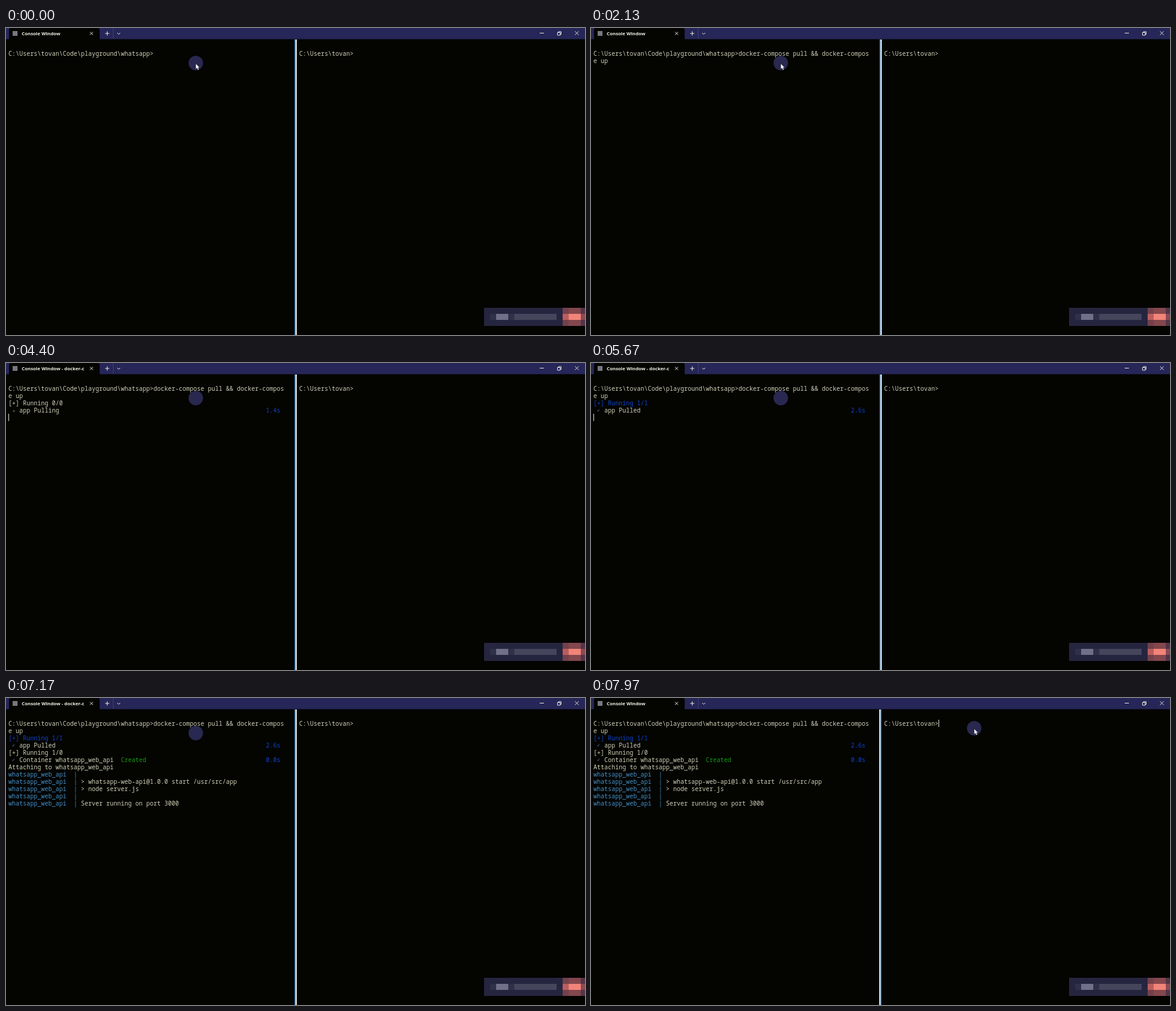
These frames come from a looping animation (958x508 px, 8 s). An HTML page:

```html
<!DOCTYPE html>
<html lang="en">
<head>
<meta charset="utf-8">
<title>Terminal session</title>
<style>
  html, body { margin: 0; width: 100%; height: 100%; overflow: hidden; background: #040400; }
  #stage { position: relative; width: 958px; height: 508px; overflow: hidden; background: #040400; }
  #stage > * { position: absolute; }
  svg { left: 0; top: 0; }
  .cell {
    font: 500 10px/12px "Noto Sans Mono", "DejaVu Sans Mono", monospace;
    white-space: pre; color: #cfcfb8; font-variant-ligatures: none;
  }
  .blue { color: #0a45cc; }
  .cyan { color: #438fc9; }
  .green { color: #169a16; }
  .check { color: #5c8fd6; font-size: 8px; }
  .caret { width: 1px; height: 12px; background: #e4e4d0; }
  #title {
    left: 26px; top: 3px; color: #f2f2e6; white-space: pre;
    font: 700 7.8px/12px "Open Sans", "Noto Sans", sans-serif;
  }
  #halo { left: -12px; top: -12px; width: 24px; height: 24px; border-radius: 50%; background: #262550; mix-blend-mode: screen; }
  #arrow { left: -1px; top: 0; }
</style>
</head>
<body>
<div id="stage">
  <svg width="958" height="508" fill="none" stroke="#e8e8e0">
    <g stroke="none">
      <path fill="#262658" d="M0 0H958V18.500H0z"/>
      <path fill="#040400" d="M5 19V3Q5 0 8 0H152Q155 0 155 3V19z"/>
      <path fill="#40406c" d="M177 0h1v18h-1z"/>
      <path fill="#77777f" d="M11 5h8v8h-8z"/>
    </g>
    <path d="M139 6.500l5 5m0-5l-5 5M164 9h7M167.500 5.500v7M184 8l2.500 2.500L189 8M883 8.500h7M941.500 5.500l6 6m0-6l-6 6"/>
    <path d="M912.500 7.500h4.500v4.500h-4.500zM914 7.500V6h4.500v4.500H917"/>
    <g id="split" stroke="none">
      <path fill="#2a5f8f" d="M477 19h2v489h-2z"/>
      <path fill="#f4f8fa" d="M479 19h2v489h-2z"/>
    </g>
    <g id="splitRight" stroke="none">
      <path fill="#f4f8fa" d="M477 19h2v489h-2z"/>
      <path fill="#2a5f8f" d="M479 19h2v489h-2z"/>
    </g>
    <g stroke="none">
      <path fill="#25253f" d="M791 463H921V493H791z"/>
      <path fill="#303049" d="M801 473h10v10h-10zM831 473h10v10h-10z"/>
      <path fill="#707089" d="M811 473h20v10h-20z"/>
      <path fill="#45455c" d="M841 473h70v10h-70z"/>
      <path fill="#73414b" d="M921 463h37v30h-37z"/>
      <path fill="#84474d" d="M931 463h20v10h-20zM931 483h20v10h-20z"/>
      <path fill="#bb5d5e" d="M921 473h10v10h-10z"/>
      <path fill="#f28479" d="M931 473h20v10h-20z"/>
      <path fill="#53344a" d="M951 463h7v30h-7z"/>
      <path fill="#8a4a50" d="M951 473h7v10h-7z"/>
    </g>
  </svg>
  <div id="title"></div>
</div>
<script>
const LOOP = 8000, END = LOOP + 1, CELL = 6, ROW = 12;
const LEFT = 4, RIGHT = 485, TOP = 36;
const PULLED = 5640, CREATED = 5900, ATTACHED = 5970, NPM = 6530, SERVER = 6900, FOCUS = 7870;
const stage = document.getElementById('stage');
const timed = [];

function add(cls, x, row, from, to, text = '') {
  const el = document.createElement('div');
  el.className = cls;
  el.style.left = x + 'px';
  el.style.top = TOP + row * ROW + 'px';
  el.textContent = text;
  stage.append(el);
  timed.push({ el, from, to });
  return el;
}
const put = (col, row, text, from = 0, to = END, color = '') =>
  add('cell ' + color, LEFT + col * CELL, row, from, to, text);
const caret = (from, to, row, col = 0, x = LEFT) => add('caret', x + col * CELL, row, from, to);

put(0, 0, 'C:\\Users\\tovan\\Code\\playground\\whatsapp>');
add('cell', RIGHT, 0, 0, END, 'C:\\Users\\tovan>');
put(40, 0, 'docker-compose pull && docker-compos', 1530);
put(0, 1, 'e up', 1530);
put(0, 2, '[+] Running 0/0', 3000, 5600);
put(0, 2, '[+] Running 1/1', 5600, END, 'blue');
put(1, 3, '-', 3000, PULLED);
put(3, 3, 'app Pulling', 3000, PULLED);
put(1, 3, '✓', PULLED, END, 'check');
put(3, 3, 'app Pulled', PULLED);
const counter = put(71, 3, '', 3000, END, 'blue');
put(0, 4, '[+] Running 1/0', CREATED);
put(1, 5, '✓', CREATED, END, 'check');
put(3, 5, 'Container whatsapp_web_api', CREATED);
put(31, 5, 'Created', CREATED, END, 'green');
put(71, 5, '0.0s', CREATED, END, 'blue');
put(0, 6, 'Attaching to whatsapp_web_api', ATTACHED);

const log = ['', '> whatsapp-web-api@1.0.0 start /usr/src/app', '> node server.js', '', 'Server running on port 3000'];
log.forEach((text, i) => {
  const from = i < 4 ? NPM : SERVER;
  put(0, 7 + i, 'whatsapp_web_api  |', from, END, 'cyan');
  put(20, 7 + i, text, from);
});

caret(30, 570, 0, 40);
caret(1100, 1530, 0, 40);
caret(1530, 2130, 1, 4);
caret(2570, 3000, 2);
caret(3000, 3400, 4);
caret(3930, 4460, 4);
caret(5000, CREATED, 4);
caret(CREATED, ATTACHED, 6);
caret(ATTACHED, 6400, 7);
caret(SERVER, 7130, 12);
caret(FOCUS, END, 0, 15, RIGHT);

const halo = document.createElement('div');
halo.id = 'halo';
stage.append(halo);
stage.insertAdjacentHTML('beforeend', `<svg id="arrow" width="10" height="13" viewBox="-1 -1 10 13">
  <path d="M0 0V9L2 7.200L3.600 10.400L5.200 9.600L3.700 6.600H6.500z" fill="#fff" stroke="#222" stroke-width=".5"/></svg>`);
const arrow = document.getElementById('arrow');
const title = document.getElementById('title');
const split = document.getElementById('split');
const splitRight = document.getElementById('splitRight');

// time, x, y of the pointer tip
const path = [
  [7200, 314, 58], [7330, 392, 33], [7420, 474, 26], [7530, 559, 47],
  [7570, 583, 54], [7680, 624, 53], [7800, 634, 50]
];
function tip(t) {
  const i = path.findIndex(p => p[0] > t);
  if (i < 0) return path[path.length - 1].slice(1);
  if (i === 0) return path[0].slice(1);
  const [a, b] = [path[i - 1], path[i]], k = (t - a[0]) / (b[0] - a[0]);
  return [1, 2].map(n => a[n] + (b[n] - a[n]) * k);
}
const move = (el, [x, y]) => el.style.transform = `translate(${x}px,${y}px)`;
const show = (el, on) => el.style.visibility = on ? 'visible' : 'hidden';

function render(t) {
  for (const { el, from, to } of timed) show(el, t >= from && t < to);
  const tenths = Math.max(1, Math.min(26, Math.floor((t - 3030) / 100) + 1));
  counter.textContent = (tenths / 10).toFixed(1) + 's';
  const running = t >= 2600 && t < FOCUS;
  title.textContent = 'Console Window' + (running ? ' - docker-c' : '');
  show(split, t < FOCUS);
  show(splitRight, t >= FOCUS);
  show(arrow, t < 2570 || t > 7200);
  move(arrow, tip(t));
  move(halo, tip(t - 40));
}

const start = performance.now();
function tick() {
  render((performance.now() - start) % LOOP);
  requestAnimationFrame(tick);
}
render(0);
requestAnimationFrame(tick);
</script>
</body>
</html>
```
